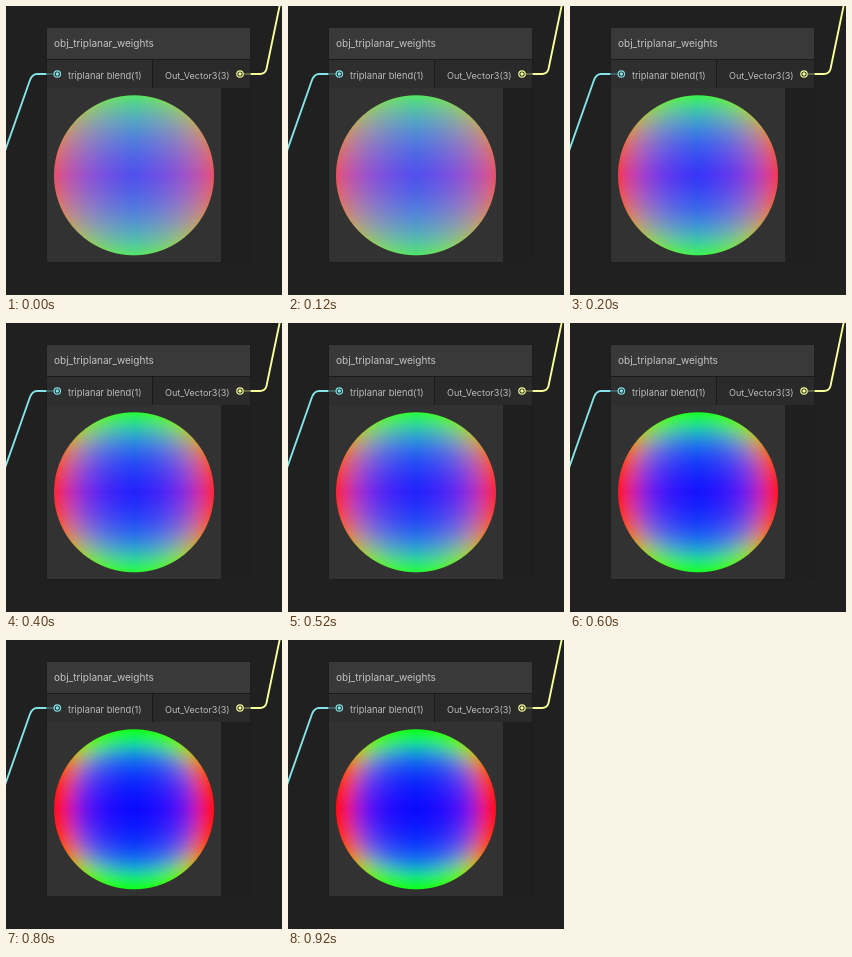
These frames come from a looping animation (276x289 px, 1000 ms). An HTML page with a canvas:

```html
<!DOCTYPE html>
<html lang="en">
<head>
<meta charset="utf-8">
<title>Triplanar weights node</title>
<style>
  html, body { margin: 0; width: 100%; height: 100%; overflow: hidden; background: #202020; }
  canvas { display: block; }
</style>
</head>
<body>
<canvas id="stage" width="276" height="289"></canvas>
<script>
const ctx = document.getElementById('stage').getContext('2d');
const STEPS = 5, STEP_MS = 200;
const BALL = { x: 128, y: 169.3, r: 80 };
const CYAN = '#84e4e7', YELLOW = '#f6ff9a';

function rect(x, y, w, h, color) {
  ctx.fillStyle = color;
  ctx.fillRect(x, y, w, h);
}

function label(text, x, y, size, color) {
  ctx.font = `${size}px Inter, Roboto, sans-serif`;
  ctx.fillStyle = color;
  ctx.fillText(text, x, y);
}

function wire(path, color, width) {
  ctx.strokeStyle = color;
  ctx.lineWidth = width;
  ctx.stroke(new Path2D(path));
}

function port(x, y, color) {
  ctx.beginPath();
  ctx.arc(x, y, 3.2, 0, 7);
  ctx.fillStyle = '#202020';
  ctx.fill();
  ctx.strokeStyle = color;
  ctx.lineWidth = 1.2;
  ctx.stroke();
  ctx.beginPath();
  ctx.arc(x, y, 1.7, 0, 7);
  ctx.fillStyle = color;
  ctx.fill();
}

function drawNode() {
  rect(0, 0, 276, 289, '#202020');
  wire('M-1 145 L24 74 Q26.5 68 31 68 H41', CYAN, 1.9);
  wire('M244 68 H254 Q259 68 260.5 63 L274 -2', YELLOW, 1.9);

  rect(40.5, 21.5, 204, 235, '#1a1a1a');
  rect(41, 22, 203, 31, '#393939');
  rect(41, 54, 105, 28, '#2e2e2e');
  rect(147, 54, 97, 28, '#2a2a2a');
  rect(41, 82, 203, 174, '#1f1f1f');
  rect(41, 82, 174, 174, '#323232');

  wire('M41 68 H48', '#47777a', 1.3);
  wire('M237 68 H244', '#7d8152', 1.3);
  port(51.3, 68, CYAN);
  port(234, 68, YELLOW);

  label('obj_triplanar_weights', 48, 41, 10.05, '#c4c4c4');
  label('triplanar blend(1)', 62, 72.7, 9.25, '#bcbcbc');
  label('Out_Vector3(3)', 159, 72.7, 9.1, '#bcbcbc');
}

const toSrgb = v => 255 * (v <= 0.0031308 ? 12.92 * v : 1.055 * v ** (1 / 2.4) - 0.055);

// Softmax of the absolute surface normal, encoded as sRGB
function weights(normal, sharpness) {
  const e = normal.map(n => Math.exp(sharpness * Math.abs(n)));
  const sum = e[0] + e[1] + e[2];
  return e.map(v => toSrgb(v / sum));
}

// Normal of a sphere seen by a slightly perspective camera
function normalAt(dx, dy) {
  const d = Math.hypot(dx, dy), s = Math.min(d, 1), ratio = 0.1;
  const angle = Math.asin(s) - Math.asin(s * ratio);
  const k = d ? Math.sin(angle) / d : 0;
  return [dx * k, dy * k, Math.cos(angle)];
}

function ballImage(sharpness) {
  const size = 164, half = size / 2;
  const canvas = document.createElement('canvas');
  canvas.width = canvas.height = size;
  const c = canvas.getContext('2d');
  const image = c.createImageData(size, size);
  const oy = BALL.y - Math.floor(BALL.y);
  for (let y = 0; y < size; y++) {
    for (let x = 0; x < size; x++) {
      const dx = x + 0.5 - half, dy = y + 0.5 - half - oy;
      const cover = Math.max(0, Math.min(1, BALL.r + 0.5 - Math.hypot(dx, dy)));
      if (!cover) continue;
      const color = weights(normalAt(dx / BALL.r, dy / BALL.r), sharpness);
      image.data.set([...color, 255 * cover], (y * size + x) * 4);
    }
  }
  c.putImageData(image, 0, 0);
  return canvas;
}

const balls = Array.from({ length: STEPS }, (_, i) => ballImage(2.35 + 0.87 * i));

function frame() {
  const step = Math.floor(performance.now() / STEP_MS) % STEPS;
  drawNode();
  ctx.drawImage(balls[step], BALL.x - 82, Math.floor(BALL.y) - 82);
  requestAnimationFrame(frame);
}
frame();
</script>
</body>
</html>
```
